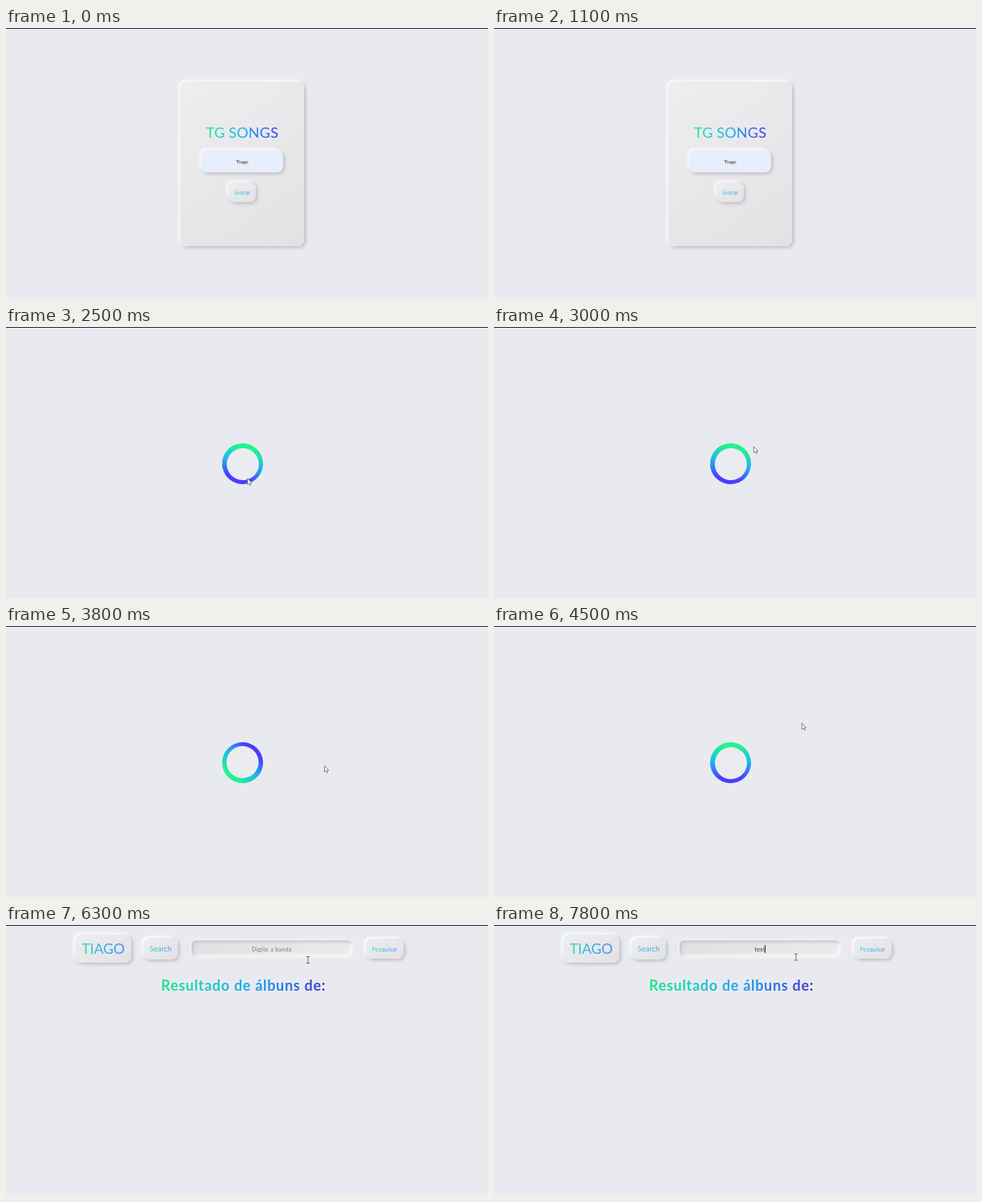
These frames come from a looping animation (600 px wide and 338 px high, 8 s). An HTML page:

```html
<!DOCTYPE html>
<html lang="pt">
<head>
<meta charset="utf-8">
<style>
html, body { margin: 0; width: 100%; height: 100%; overflow: hidden; background: #e9eaef; }
body { position: relative; font: 7px Lato, Inter, sans-serif; color: #333; }
body::before { content: ""; position: absolute; left: 0; top: 0; width: 100%; height: 1px; background: #25243f; }
.scene { position: absolute; inset: 0; }
.box, .line { position: absolute; display: grid; place-items: center; white-space: nowrap; }
.box {
  border-radius: 8px;
  background: linear-gradient(145deg, #eeeef0, #e2e2e5);
  box-shadow: 2px 2px 4px #bdbdc3, -2px -2px 3px #fff;
}
.grad {
  background: linear-gradient(90deg, #20e796, #20b2ee 50%, #4436e8);
  -webkit-background-clip: text; background-clip: text; color: transparent;
}
.soft { background-image: linear-gradient(90deg, #3cd9ae, #35aaf0 60%, #5088f0); }

#card { left: 217px; top: 67px; width: 154px; height: 205px; }
#title { left: 217px; top: 119px; width: 154px; height: 22px; font-size: 18px; letter-spacing: .2px; }
#user { left: 243px; top: 152px; width: 102px; height: 28px; font-size: 6.5px; background: #e7effd; }
#enter { left: 277px; top: 192px; width: 34px; height: 25px; letter-spacing: .15px; }

#ring {
  position: absolute; left: 268.5px; top: 144.5px; width: 51px; height: 51px; border-radius: 50%;
  background: linear-gradient(#20f58c 8%, #1db8ee 48%, #4a3cff 88%);
}
#ring::after { content: ""; position: absolute; inset: 5.5px; border-radius: 50%; background: #ebecf0; }

#home { left: 86px; top: 12px; width: 70px; height: 35px; font-size: 17.5px; }
#search { left: 171px; top: 16px; width: 43px; height: 27px; font-size: 9px; letter-spacing: .2px; }
#field { left: 229px; top: 17px; width: 204px; height: 25px; }
#field > * { grid-area: 1 / 1; }
#field.on {
  left: 231px; top: 19px; width: 200px; height: 21px; border-radius: 6px;
  background: linear-gradient(145deg, #e0e0e3, #ececef);
  box-shadow: inset 2px 2px 4px #c3c3c9, inset -2px -2px 4px #fff, 0 0 2px 1px #f5f5f8;
}
#hint { color: #777; letter-spacing: .4px; }
#typed { position: relative; letter-spacing: .3px; }
#caret { position: absolute; right: -1px; top: 50%; width: 1px; height: 10px; margin-top: -5px; background: #333; }
#find { left: 448px; top: 17px; width: 47px; height: 25px; letter-spacing: .3px; }
#result { left: 193px; top: 63px; width: 204px; height: 24px; font-size: 18px; font-weight: 700; letter-spacing: .7px; }
#result .grad {
  background-image: linear-gradient(90deg,
    color-mix(in srgb, #b8cf3e var(--warm), #20e58c),
    color-mix(in srgb, #ee6a3a var(--warm), #20cfc0) 25%,
    color-mix(in srgb, #e01c68 var(--warm), #20b0ea) 50%,
    color-mix(in srgb, #8c189c var(--warm), #2c7be6) 75%,
    #4030d0);
}
#pointer { position: absolute; left: 0; top: 0; overflow: visible; }
</style>
</head>
<body>
<div class="scene" id="login">
  <div class="box" id="card"></div>
  <div class="line" id="title"><span class="grad">TG SONGS</span></div>
  <div class="box" id="user">Tiago</div>
  <div class="box" id="enter"><span class="grad soft">Entrar</span></div>
</div>
<div class="scene" id="loading"><div id="ring"></div></div>
<div class="scene" id="albums">
  <div class="box" id="home"><span class="grad soft">TIAGO</span></div>
  <div class="box" id="search"><span class="grad soft">Search</span></div>
  <div class="box" id="field">
    <span id="hint">Digite a banda</span>
    <span id="typed"><span id="text"></span><i id="caret"></i></span>
  </div>
  <div class="box" id="find"><span class="grad soft">Pesquisar</span></div>
  <div class="line" id="result"><span class="grad">Resultado de álbuns de:</span></div>
</div>
<svg id="pointer" width="10" height="12">
  <path id="arrow" d="M.3 .3V8L2.1 6.4L3.4 9L4.6 8.4L3.5 6L5.6 5.8Z" fill="#fff" stroke="#555" stroke-width=".7"/>
  <path id="beam" d="M-2.2 -4H2.2M0 -4V4M-2.2 4H2.2" fill="none" stroke="#555" stroke-width=".8"/>
</svg>
<script>
const LOOP = 8000, LOAD = 1800, READY = 5300, FOCUS = 5700;
const $ = id => document.getElementById(id);
const show = (id, on) => { $(id).style.display = on ? "" : "none"; };

// time, x, y
const path = [
  [1800, 291, 205], [2150, 291, 205], [2600, 303, 184], [3000, 323, 149],
  [3300, 350, 117], [3500, 373, 138], [3800, 396, 174], [4050, 411, 158],
  [4300, 391, 117], [4500, 383, 121], [5000, 380, 80], [5400, 378, 66],
  [5700, 376, 36], [6000, 376, 49], [6150, 376, 49], [6400, 376, 40], [LOOP, 376, 40]
];
const keys = [7400, 7500, 7700, 7800];

function pointerAt(t) {
  const i = path.findIndex(p => p[0] > t);
  const [t0, x0, y0] = path[i - 1], [t1, x1, y1] = path[i];
  const k = (t - t0) / (t1 - t0);
  return [x0 + (x1 - x0) * k, y0 + (y1 - y0) * k];
}

function draw(t) {
  const ready = t >= READY;
  show("login", t < LOAD);
  show("loading", t >= LOAD && !ready);
  show("albums", ready);
  show("pointer", t >= LOAD);
  show("arrow", !ready);
  show("beam", ready);

  $("ring").style.transform = `rotate(${90 + (t - 2100) * .7125}deg)`;
  if (t >= LOAD) {
    const [x, y] = pointerAt(t);
    $("pointer").style.transform = `translate(${x}px, ${y}px)`;
  }

  const warm = Math.max(0, Math.min(1, (6000 - t) / 600));
  $("result").style.setProperty("--warm", warm * 100 + "%");

  const count = keys.filter(k => t >= k).length;
  const blink = Math.floor((t - FOCUS) / 500) % 2 === 0;
  $("field").classList.toggle("on", t >= FOCUS);
  $("text").textContent = "test".slice(0, count);
  show("hint", !count);
  show("caret", t >= FOCUS && (count || blink));
}

const start = performance.now();
function tick() {
  draw((performance.now() - start) % LOOP);
  requestAnimationFrame(tick);
}
tick();
</script>
</body>
</html>
```
